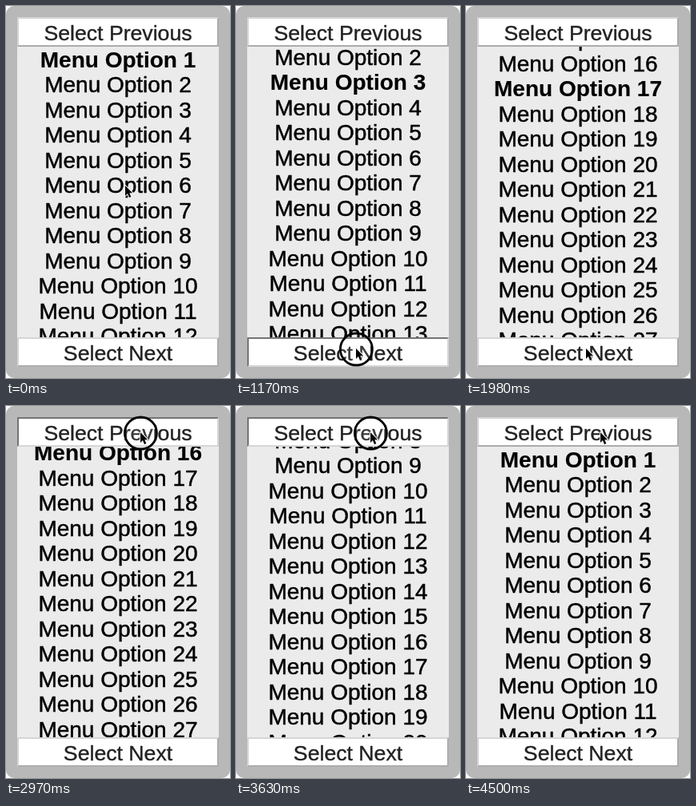
An HTML page with a canvas for the animation above (4530 ms loop, 280 px wide and 466 px high).

```html
<!DOCTYPE html>
<html lang="en">
<head>
<meta charset="utf-8">
<title>Menu scroll</title>
<style>
  html, body { margin: 0; width: 100%; height: 100%; overflow: hidden; background: #fff; }
  canvas { display: block; width: 280px; height: 466px; }
</style>
</head>
<body>
<canvas id="stage"></canvas>
<script>
const W = 280, H = 466, LOOP = 4530;
const ROW = 31.5, ROWS = 30;
const FONT = '"Liberation Sans", Arial, sans-serif';
const REPEAT_DELAY = 350, REPEAT_STEP = 50;
const NEXT = { down: 790, up: 1875 };
const PREVIOUS = { down: 2820, up: 4380 };

// Key points as [time, value]
const SCROLL = [[790, 0], [1000, ROW], [1140, ROW], [1500, 223.5], [1980, 467], [2180, 504],
  [2820, 504], [2970, 481], [3100, 472.5], [3170, 472.5], [3630, 244.7], [4010, 37], [4220, 0]];
const CURSOR_X = [[60, 149], [500, 150], [2220, 150], [2720, 168]];
const CURSOR_Y = [[60, 225], [540, 450], [740, 429], [2220, 429], [2760, 33]];

const canvas = document.getElementById('stage');
const ctx = canvas.getContext('2d');
const scale = window.devicePixelRatio || 1;
canvas.width = W * scale;
canvas.height = H * scale;

// Monotone cubic interpolation: flat at extremes, no overshoot
function follow(points, t) {
  const last = points.length - 1;
  if (t <= points[0][0]) return points[0][1];
  if (t >= points[last][0]) return points[last][1];
  const slope = i => (points[i + 1][1] - points[i][1]) / (points[i + 1][0] - points[i][0]);
  const tangent = i => {
    if (i === 0 || i === last) return 0;
    const a = slope(i - 1), b = slope(i);
    return a * b > 0 ? 2 * a * b / (a + b) : 0;
  };
  let i = 0;
  while (t >= points[i + 1][0]) i++;
  const [t0, v0] = points[i], [t1, v1] = points[i + 1];
  const span = t1 - t0, u = (t - t0) / span, u2 = u * u, u3 = u2 * u;
  return v0 * (2 * u3 - 3 * u2 + 1) + v1 * (3 * u2 - 2 * u3)
    + span * (tangent(i) * (u3 - 2 * u2 + u) + tangent(i + 1) * (u3 - u2));
}

const held = (press, t) => t >= press.down && t < press.up;

// One step on press, then repeated steps while held
function steps(press, t) {
  if (t < press.down) return 0;
  const repeating = Math.min(t, press.up) - press.down - REPEAT_DELAY;
  return 1 + Math.max(0, Math.floor(repeating / REPEAT_STEP) + 1);
}

function selectedRow(t) {
  const reached = Math.min(17, 1 + steps(NEXT, t));
  return Math.max(1, reached - steps(PREVIOUS, t));
}

function rect(x, y, w, h, color) {
  ctx.fillStyle = color;
  ctx.fillRect(x, y, w, h);
}

// A hairline outline gives the letters a slightly heavier weight
function text(label, y, font, color, outline) {
  ctx.font = `${font} ${FONT}`;
  ctx.fillStyle = ctx.strokeStyle = color;
  ctx.lineWidth = outline;
  ctx.lineJoin = 'round';
  ctx.fillText(label, W / 2, y);
  ctx.strokeText(label, W / 2, y);
}

function drawButton(label, y, pressed) {
  const x = 14, w = 252, h = 37;
  rect(x, y, w, h, pressed ? '#d6d6d6' : '#acacac');
  ctx.fillStyle = pressed ? '#747474' : '#d6d6d6';
  ctx.beginPath();
  ctx.moveTo(x, y);
  ctx.lineTo(x + w, y);
  ctx.lineTo(x + w - 2, y + 2);
  ctx.lineTo(x + 2, y + 2);
  ctx.lineTo(x + 2, y + h - 2);
  ctx.lineTo(x, y + h);
  ctx.fill();
  rect(x + 2, y + 2, w - 4, h - 4, '#fff');
  text(label, y + 28.5, '26.667px', '#222', 0.4);
}

function drawList(t) {
  const top = 51, bottom = 415;
  const scroll = follow(SCROLL, t), selected = selectedRow(t);
  rect(14, top, 252, bottom - top, '#ebebeb');
  ctx.save();
  ctx.beginPath();
  ctx.rect(14, top, 252, bottom - top);
  ctx.clip();
  for (let n = 1; n <= ROWS; n++) {
    const y = Math.floor(77 + (n - 1) * ROW - scroll);
    if (y < top - 10 || y > bottom + 30) continue;
    const bold = n === selected;
    text(`Menu Option ${n}`, y, bold ? 'bold 28px' : '28px', '#000', bold ? 0.15 : 0.5);
  }
  ctx.restore();
}

function drawRing(x, y) {
  ctx.beginPath();
  ctx.arc(x, y, 20, 0, Math.PI * 2);
  ctx.fillStyle = 'rgba(255,255,255,0.1)';
  ctx.fill();
  ctx.lineWidth = 2.8;
  ctx.strokeStyle = '#000';
  ctx.stroke();
}

function drawCursor(x, y) {
  const arrow = new Path2D('M0 0V14L3.2 11L5.4 16.2L8 15.1L5.8 10H10Z');
  ctx.save();
  ctx.translate(x, y);
  ctx.scale(0.92, 0.92);
  ctx.lineJoin = 'round';
  ctx.lineWidth = 2;
  ctx.strokeStyle = '#fff';
  ctx.stroke(arrow);
  ctx.fillStyle = '#000';
  ctx.fill(arrow);
  ctx.restore();
}

function draw(t) {
  ctx.setTransform(scale, 0, 0, scale, 0, 0);
  ctx.textAlign = 'center';
  ctx.textBaseline = 'alphabetic';
  rect(0, 0, W, H, '#fff');
  ctx.fillStyle = '#b8b8b8';
  ctx.beginPath();
  ctx.roundRect(0, 0, W, H, 10);
  ctx.fill();

  const nextHeld = held(NEXT, t), previousHeld = held(PREVIOUS, t);
  drawList(t);
  drawButton('Select Previous', 14, previousHeld);
  drawButton('Select Next', 415, nextHeld);

  const x = follow(CURSOR_X, t), y = follow(CURSOR_Y, t);
  if (nextHeld || previousHeld) drawRing(x + 0.4, y + 1);
  drawCursor(x, y);
}

const start = performance.now();
function tick() {
  draw((performance.now() - start) % LOOP);
  requestAnimationFrame(tick);
}
tick();
</script>
</body>
</html>
```
